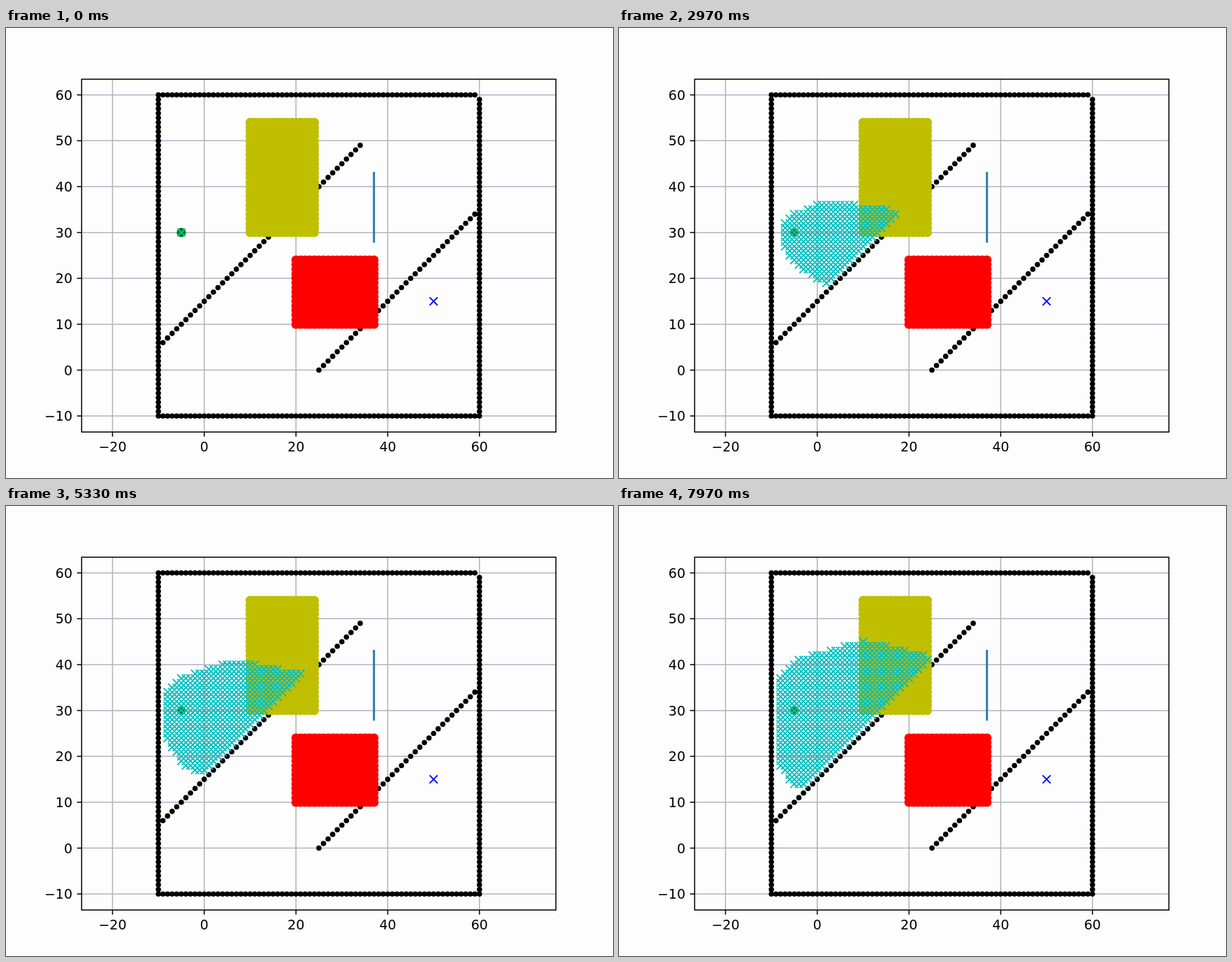
Animation of 869x644 px, one loop 8 s. Source, as an HTML page with a canvas:

```html
<!DOCTYPE html>
<html lang="en">
<head>
<meta charset="utf-8">
<title>Grid path search</title>
<style>
  html, body { margin: 0; width: 100%; height: 100%; overflow: hidden; background: #fdfdfd; }
  canvas { display: block; }
</style>
</head>
<body>
<canvas id="stage" width="869" height="644"></canvas>
<script>
const LOOP = 8000;
const PT = 1.9; // pixels per typographic point
const AXES = { left: 108.3, top: 73.3, right: 787.3, bottom: 578.2 };
const START = [-5, 30];
const GOAL = [50, 15];
const SLOW = { x: [10, 24], y: [30, 54], extra: 0.015 };

// Time in ms against the number of ten-cell batches explored.
const PACE = [[0, 0.2], [930, 9.5], [2070, 20.5], [3870, 33.5], [5330, 42.5], [6630, 50.5], [8000, 58.5]];

const px = x => 283.8 + 6.567 * x;
const py = y => 489.6 - 6.565 * y;
const range = (from, to) => Array.from({ length: to - from + 1 }, (_, i) => from + i);
const inside = (v, [lo, hi]) => v >= lo && v <= hi;

const walls = [
  ...range(-10, 59).map(x => [x, 60]),
  ...range(-10, 60).map(x => [x, -10]),
  ...range(-10, 60).map(y => [-10, y]),
  ...range(-10, 59).map(y => [60, y]),
  ...range(-10, 34).map(x => [x, x + 15]),
  ...range(25, 59).map(x => [x, x - 25])
];

// A* over the grid; returns cells in the order they are expanded.
function explore(limit) {
  const id = (x, y) => x + ',' + y;
  const blocked = new Set();
  for (const [x, y] of walls) {
    for (const [dx, dy] of [[0, 0], [1, 0], [-1, 0], [0, 1], [0, -1]]) blocked.add(id(x + dx, y + dy));
  }
  const moves = [[1, 0], [0, 1], [-1, 0], [0, -1], [-1, -1], [-1, 1], [1, -1], [1, 1]];
  const toGoal = (x, y) => Math.hypot(GOAL[0] - x, GOAL[1] - y);
  const open = new Map([[id(...START), { x: START[0], y: START[1], cost: 0, total: 0 }]]);
  const closed = new Set();
  const order = [];
  while (order.length < limit && open.size) {
    let best = null;
    for (const node of open.values()) if (!best || node.total < best.total) best = node;
    const key = id(best.x, best.y);
    open.delete(key);
    closed.add(key);
    order.push([best.x, best.y]);
    for (const [dx, dy] of moves) {
      const x = best.x + dx, y = best.y + dy, next = id(x, y);
      if (blocked.has(next) || closed.has(next)) continue;
      const slow = inside(x, SLOW.x) && inside(y, SLOW.y);
      const cost = best.cost + Math.hypot(dx, dy) + (slow ? SLOW.extra : 0);
      const known = open.get(next);
      if (!known || known.cost > cost) open.set(next, { x, y, cost, total: cost + toGoal(x, y) });
    }
  }
  return order;
}

function line(c, x1, y1, x2, y2, color, width) {
  c.strokeStyle = color;
  c.lineWidth = width;
  c.beginPath();
  c.moveTo(x1, y1);
  c.lineTo(x2, y2);
  c.stroke();
}

function dots(c, points, radius, color) {
  c.fillStyle = color;
  c.beginPath();
  for (const [x, y] of points) {
    c.moveTo(px(x) + radius, py(y));
    c.arc(px(x), py(y), radius, 0, 2 * Math.PI);
  }
  c.fill();
}

function crosses(c, points, color) {
  const r = 3 * PT;
  c.strokeStyle = color;
  c.lineWidth = PT;
  c.beginPath();
  for (const [x, y] of points) {
    const cx = px(x), cy = py(y);
    c.moveTo(cx - r, cy - r);
    c.lineTo(cx + r, cy + r);
    c.moveTo(cx - r, cy + r);
    c.lineTo(cx + r, cy - r);
  }
  c.stroke();
}

const block = (x1, x2, y1, y2) => range(x1, x2).flatMap(x => range(y1, y2).map(y => [x, y]));

function drawPlot(c) {
  const { left, top, right, bottom } = AXES;
  const thin = 0.8 * PT, tick = 3.5 * PT;
  const label = v => String(v).replace('-', '\u2212');
  c.fillStyle = '#fdfdfd';
  c.fillRect(0, 0, 869, 644);
  c.font = '19px "DejaVu Sans", sans-serif';

  for (let x = -20; x <= 60; x += 20) {
    line(c, px(x), top, px(x), bottom, '#b2b2b2', thin);
    line(c, px(x), bottom, px(x), bottom + tick, '#000', thin);
    c.fillStyle = '#000';
    c.textAlign = 'center';
    c.fillText(label(x), px(x), 606);
  }
  for (let y = -10; y <= 60; y += 10) {
    line(c, left, py(y), right, py(y), '#b2b2c8', thin);
    line(c, left - tick, py(y), left, py(y), '#000', thin);
    c.fillStyle = '#000';
    c.textAlign = 'right';
    c.fillText(label(y), left - 2 * tick, py(y) + 7);
  }

  dots(c, walls, 2 * PT, '#000');
  dots(c, [START], 3.5 * PT, '#008000');
  crosses(c, [GOAL], '#0000ff');
  dots(c, block(10, 24, 30, 54), 3.5 * PT, '#bfbf00');
  dots(c, block(20, 37, 10, 24), 3.5 * PT, '#ff0000');
  line(c, px(37), py(43) - 1.4, px(37), py(28) + 1.4, '#1f77b4', 1.5 * PT);
  c.strokeStyle = '#000';
  c.lineWidth = thin;
  c.strokeRect(left, top, right - left, bottom - top);
}

function batchesAt(t) {
  const i = PACE.findIndex(([end]) => t < end);
  const [t0, b0] = PACE[i - 1], [t1, b1] = PACE[i];
  return Math.floor(b0 + (b1 - b0) * (t - t0) / (t1 - t0));
}

const stage = document.getElementById('stage').getContext('2d');
const backdrop = document.createElement('canvas');
backdrop.width = 869;
backdrop.height = 644;
drawPlot(backdrop.getContext('2d'));
const explored = explore(1 + 10 * 58);

function render() {
  const t = performance.now() % LOOP;
  stage.drawImage(backdrop, 0, 0);
  crosses(stage, explored.slice(0, 1 + 10 * batchesAt(t)), '#00bfbf');
  requestAnimationFrame(render);
}
render();
</script>
</body>
</html>
```
